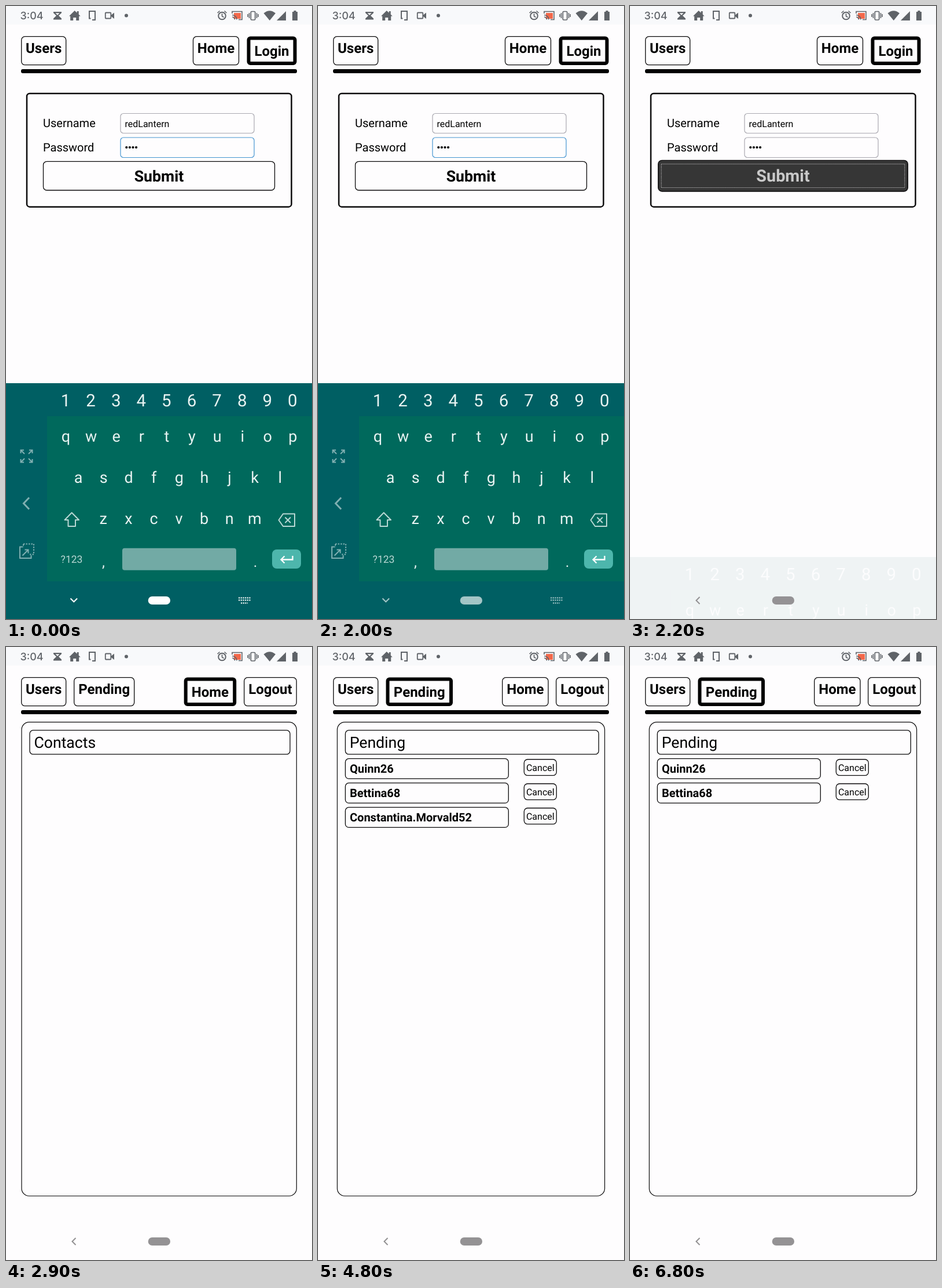
These frames come from a looping animation (529 px wide and 1058 px high, 8000 ms). An HTML page:

```html
<!DOCTYPE html>
<html lang="en">
<head>
<meta charset="utf-8">
<title>Contacts app</title>
<style>
html, body { margin: 0; width: 100%; height: 100%; overflow: hidden; background: #fefdfe; }
svg { display: block; width: 100%; height: 100%; }
text { font-family: Roboto, sans-serif; text-rendering: geometricPrecision; }
.b { font-weight: 700; }
.c { text-anchor: middle; }
.line { fill: none; stroke-width: 2; }
</style>
</head>
<body>
<svg id="stage" viewBox="0 0 529 1058"></svg>
<script>
const INK = '#0b0a0b', PAPER = '#fefdfe', GREY = '#5f6368';

const text = (x, y, size, str, cls = '', extra = '') =>
  `<text x="${x}" y="${y}" font-size="${size}" class="${cls}" ${extra}>${str}</text>`;
const box = (x, y, w, h, r = 6, stroke = 1.3, color = INK, fill = 'none') =>
  `<rect x="${x}" y="${y}" width="${w}" height="${h}" rx="${r}" stroke="${color}" stroke-width="${stroke}" fill="${fill}"/>`;
const fill = (x, y, w, h, color, r = 0) => box(x, y, w, h, r, 0, 'none', color);
const path = (d, extra = '') => `<path d="${d}" ${extra}/>`;
const group = (id, body, extra = '') => `<g id="${id}" ${extra}>${body}</g>`;
const repeat = (n, f) => Array.from({ length: n }, (_, i) => f(i)).join('');

// Outlined button; with an id it can be pressed, with ring it shows a focus outline.
function button(x, y, w, h, label, size, base, cls = 'b', id = '', ring = false) {
  const focus = ring
    ? `<rect class="ring" x="${x + 5}" y="${y + 6}" width="${w - 10}" height="${h - 12}" fill="none" stroke="#c9c7c9" stroke-dasharray="1 1" visibility="hidden"/>`
    : '';
  return `<g ${id && `id="${id}"`} data-cx="${x + w / 2}" data-cy="${y + h / 2}">` +
    box(x, y, w, h, 6, 1.3, INK, PAPER) + focus +
    text(x + w / 2, base, size, label, cls + ' c') + '</g>';
}
const tab = (x, w, label, id) => button(x, 52.7, w, 49, label, 24, 80.5, 'b', id);
const activeTab = (x, w, label) =>
  box(x + 3, 55.5, w - 6, 43.5, 3, 6, '#000') + text(x + w / 2, 85.7, 24, label, 'b c');

const statusBar = fill(0, 0, 529, 32, '#f8f9fb') +
  text(24.5, 23, 18, '3:04', '', `style="font-family:Inter,sans-serif;font-weight:500" fill="${GREY}"`) +
  group('', [
    path('M82 10h14v2l-5 4.7 5 4.7v2H82v-2l5-4.7-5-4.7zM85.500 12.200h7l-3.500 3.500z', 'fill-rule="evenodd"'),
    path('M109 17.500 118.700 8l4 3.800V9h3v5.600l3 2.900h-2.500V25h-5v-5h-5v5h-5v-7.500z'),
    path('M144 19V9h10v10M144 19v2.500h2.500M154 13v11h-5', 'class="line" stroke="#5f6368"'),
    box(171.800, 11.500, 9.500, 10, 1, 1.8, GREY), path('M182 15.500l5-4v10.500l-5-4z'),
    '<circle cx="208" cy="16.500" r="3"/>',
    '<circle cx="373.500" cy="17" r="6.300" class="line" stroke="#5f6368"/>',
    path('M373.500 13v4.500l3 2M365.500 12l4-3.500M381.500 12l-4-3.500', 'class="line" stroke="#5f6368" style="stroke-width:1.600"'),
    fill(394, 12, 12, 10, '#f4694b'),
    path('M391 13V9.500h17V23.500h-6M391 15.500a8 8 0 0 1 8 8M391 19a4.500 4.500 0 0 1 4.500 4.500', `fill="${PAPER}" stroke="#5f6368" stroke-width="1.600" fill-opacity="0"`),
    box(423.300, 9.500, 7.400, 14.500, 1.500, 1.700, GREY),
    path('M420.500 12v9M433.500 12v9M418 14v5M436 14v5', 'class="line" stroke="#5f6368" style="stroke-width:1.600"'),
    path('M445.500 12.500q10.200-8.500 20.500 0L455.800 25z'),
    path('M468 25 484 9v16z'),
    path('M495 10h2.500V8h4v2h2.500v15h-9z')
  ].join(''), `fill="${GREY}"`);

const rule = fill(26, 109, 477, 7, '#000', 3);
const users = tab(26.7, 77, 'Users');

const login = users + tab(323.5, 79, 'Home') + activeTab(416.5, 86, 'Login') +
  box(36, 151, 457.5, 195.7, 5, 2.5) +
  text(64, 209.3, 20, 'Username') + text(64, 251, 20, 'Password') +
  box(198, 185.5, 231, 34, 5, 1.2, '#a9a8b0') + text(205.5, 208.500, 16, 'redLantern') +
  `<g id="password">${box(198, 227, 231, 34.5, 5, 1.2, '#a9a8b0')}</g>` +
  repeat(4, i => `<circle cx="${208.3 + 5.6 * i}" cy="244" r="2.100"/>`) +
  button(64.5, 268.3, 400, 49.7, 'Submit', 26.7, 302.5, 'b', 'submit', true);

const names = ['topE', 'wendro', 'tolvek', 'Pavlo26', 'Tessa45', 'Octavia_Pemberlund',
  'Corin.Veldt', 'Todd_Marchetano', 'Brice.Halmen', 'Rosalind.Kronfeldt52', 'Robyn64',
  'Nils.Tauwe', 'Gunther.Waldorn48', 'Mavis_Donnert', 'Bjorn52', 'Lucia35', 'Tova62', 'Nell_Bram'];
const row = (x, y, name) => box(x, y, 282, 34.7) + text(x + 7.7, y + 24.5, 20, name, 'b');

const contacts = names.map((name, i) => {
  const y = 192.7 + 42 * i + (i > 9 ? 6.8 : 0);
  return row(41, y, name) +
    button(350.5, y + 4, 74.5, 27, 'Un-Friend', 16, y + 23, '') +
    box(461.5, y + 6, 23, 23, 6, 3, '#9c9ba6');
}).join('');

const home = users + tab(117.7, 104, 'Pending', 'pendingTab') +
  activeTab(307.7, 90.5, 'Home') + tab(411.7, 90.5, 'Logout') +
  box(27, 129.7, 475.300, 817.8, 13, 1.2) + box(41, 143.7, 450, 41.5) + text(48.5, 174, 26.6, 'Contacts') +
  group('contactRows', contacts, 'clip-path="url(#list)"') +
  group('scrollbar', fill(496, 130, 3, 766, '#aaa9ad', 1.5));

const pendingRow = (name, i, id) => row(47.3, 192.7 + 42 * i, name) +
  button(356.3, 194 + 42 * i, 56, 27.7, 'Cancel', 16, 213.7 + 42 * i, '', id, !!id);

const pending = users + activeTab(117.5, 115.5, 'Pending') + tab(318.7, 79.3, 'Home') + tab(411.7, 90.5, 'Logout') +
  box(33.3, 129.7, 462.300, 817.8, 13, 1.2) + box(47.3, 143.7, 438, 41.5) + text(54.7, 174, 26.6, 'Pending') +
  group('pendingRows', pendingRow('Quinn26', 0, '') + pendingRow('Bettina68', 1, '') +
    group('lastRow', pendingRow('Constantina.Morvald52', 2, 'cancel')));

const keys = (str, x, y, size) =>
  [...str].map((k, i) => text(x + 43.6 * i, y, size, k, 'c')).join('');

const keyboard = fill(0, 651, 529, 407, '#005f63') + fill(71, 708, 458, 285, '#00695c') +
  group('', keys('1234567890', 103, 691, 29.5) + keys('qwertyuiop', 103.5, 751.5, 27) +
    keys('asdfghjkl', 125, 822.5, 27) + keys('zxcvbnm', 168.3, 893.5, 27) +
    keys(',', 168.5, 968, 25) + keys('.', 431, 968, 25), 'fill="#e8f3f2"') +
  text(113.5, 961, 17.5, '?123', 'c', 'fill="#b9d8d4"') +
  group('', path('M113.700 874.500 101.500 887h6v11h12.500v-11h6z') +
    path('M479 876.500h20v21.500h-20l-7.500-10.700zM482.500 882.500l9.500 9.500M492 882.500l-9.500 9.500'),
    'class="line" stroke="#b9d8d4" stroke-linejoin="round"') +
  fill(201, 935.7, 197, 38, '#72aaa5', 4) + fill(460, 938, 50, 33, '#4db6ac', 8) +
  path('M495.500 949v6.500h-20M481.500 949.500l-6 6 6 6', 'class="line" stroke="#fff" style="stroke-width:2.300"') +
  group('', path('M31 766.500h-5.500v5.500M26 767l6 6M40 766.500h5.500v5.500M45 767l-6 6M31 787.500h-5.500v-5.500M26 787l6-6M40 787.500h5.500v-5.500M45 787l-6-6') +
    path('M40 848.500 30.500 858.500 40 868.500', 'style="stroke-width:3"') +
    path('M29 933.500h-5v19.500h19.500v-5M28.500 948.500 38 939M32.500 938.500h6v6') +
    path('M30 928.500h18v18h-7M30 929v5', 'stroke-dasharray="2.500 2"'),
    'class="line" stroke="#80afb1"');

const navPill = color => fill(245.7, 1019, 38.3, 14, color, 7);
const navLight = path('M111.500 1022.500l5.800 5.800 5.800-5.800', 'class="line" stroke="#fff"') + navPill('#fff') +
  path('M402 1021.500h20.500M402 1025.500h20.500M406 1030.500h12', 'class="line" stroke="#fff" stroke-dasharray="2.300 1.350"');
const navDark = path('M120.500 1020l-6 6 6 6', 'class="line" stroke="#929092"') + navPill('#949294');

stage.innerHTML = '<clipPath id="list"><rect x="28" y="131" width="473" height="803"/></clipPath>' +
  fill(0, 0, 529, 1058, PAPER) + statusBar + rule +
  group('loginPage', login) + group('homePage', home) + group('pendingPage', pending) +
  group('keyboard', keyboard) + group('navLight', navLight) + group('navDark', navDark);

const $ = id => document.getElementById(id);
const show = (id, on) => $(id).style.display = on ? '' : 'none';
const clamp = v => Math.min(1, Math.max(0, v));

// CSS "ease": cubic-bezier(.25, .1, .25, 1)
function ease(x) {
  x = clamp(x);
  const curve = (s, a, b) => 3 * s * (1 - s) ** 2 * a + 3 * s * s * (1 - s) * b + s ** 3;
  let lo = 0, hi = 1;
  for (let i = 0; i < 20; i++) {
    const mid = (lo + hi) / 2;
    if (curve(mid, .25, .25) < x) lo = mid; else hi = mid;
  }
  return curve(lo, .1, 1);
}

// Pressed buttons invert their colours and grow by a tenth.
function press(id, elapsed) {
  const el = $(id), p = ease(elapsed / 300), { cx, cy } = el.dataset;
  const grey = v => `rgb(${v},${v},${v})`;
  el.setAttribute('transform', `translate(${cx} ${cy}) scale(${1 + p / 10}) translate(${-cx} ${-cy})`);
  el.querySelector('rect').setAttribute('fill', p ? grey(Math.round(254 * (1 - p))) : PAPER);
  el.querySelector('text').setAttribute('fill', grey(Math.round(255 * p)));
  el.querySelector('.ring')?.setAttribute('visibility', p ? 'inherit' : 'hidden');
}

function draw(t) {
  show('loginPage', t < 2900);
  show('homePage', t >= 2900 && t < 4690);
  show('pendingPage', t >= 4690);
  show('contactRows', t >= 3100);
  show('scrollbar', t >= 3100 && t < 3600);
  show('pendingRows', t >= 4790);
  show('lastRow', t < 6800);

  press('submit', t - 2055);
  press('pendingTab', t - 4540);
  press('cancel', t - 6270);
  $('password').firstChild.setAttribute('stroke', t < 2055 ? '#4595d0' : '#a9a8b0');

  const slide = clamp((t - 2050) / 175);
  show('keyboard', slide < 1);
  $('keyboard').setAttribute('transform', `translate(0 ${403 * slide ** 2})`);
  $('keyboard').setAttribute('opacity', clamp(1 - slide / .912));

  // Idle navigation buttons dim slowly.
  const dim = (1 - Math.cos(Math.PI * clamp((t - 100) / 1500))) / 2;
  show('navLight', t < 2055);
  show('navDark', t >= 2055);
  $('navLight').setAttribute('opacity', 1 - .36 * dim);
}

function tick() {
  draw(performance.now() % 8000);
  requestAnimationFrame(tick);
}
tick();
</script>
</body>
</html>
```
